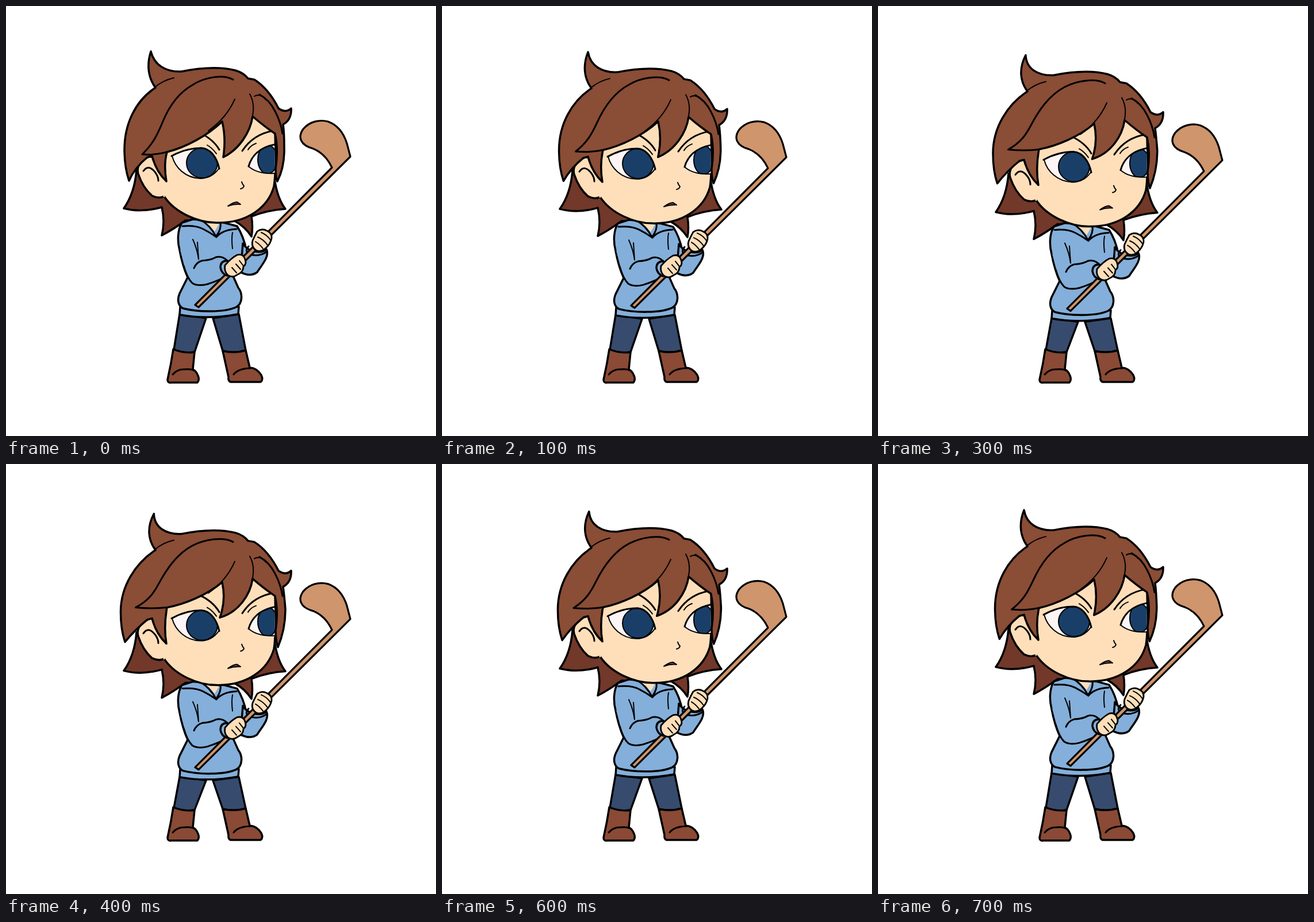
Animation, 748 px wide and 748 px high, one loop 800 ms. Source, as an HTML page:

```html
<!DOCTYPE html>
<html>
<head>
<meta charset="utf-8">
<style>
html, body { margin: 0; width: 100%; height: 100%; overflow: hidden; background: #fff; }
svg { display: block; width: 100%; height: 100%; }
path { stroke: #000; stroke-width: 3.5; stroke-linejoin: round; stroke-linecap: round; }
.line { fill: none; stroke-width: 3; }
.thin { fill: none; stroke-width: 2; }
.flat { stroke: none; }
.hair { fill: #8a4d36; }
.shade { fill: #72382a; }
.skin { fill: #ffdfba; }
.cloth { fill: #84afda; }
.pants { fill: #374b6e; }
.boot { fill: #8a4a35; }
.wood { fill: #cf956c; stroke-width: 3.2; }
.white { fill: #fdf5f5; }
.iris { fill: #193f69; stroke: #000; stroke-width: 2; }
</style>
</head>
<body>
<svg viewBox="0 0 748 748">
  <clipPath id="eyeL"><path d="M289 261C306 251 325 247 340 247C356 248 367 264 371 283Q358 301 338 301C312 300 294 281 289 261Z"/></clipPath>
  <clipPath id="eyeR"><path d="M422 279C427 261 441 246 467 241L468 292Q438 293 422 279Z"/></clipPath>

  <g id="back">
    <path class="shade" d="M227 285Q224 325 205 352Q236 360 271 350Q277 375 271 399Q292 388 312 373L398 374Q416 384 427 401Q430 385 427 366Q455 355 486 353Q472 335 467 300Z"/>
  </g>

  <g id="legs">
    <path class="pants" d="M302 536L292 598Q310 605 328 602L348 543Z"/>
    <path class="pants" d="M360 543L377 600Q398 605 417 599L405 536Z"/>
  </g>
  <path class="boot" d="M291 597Q287 624 281 650Q281 656 287 655H333Q337 650 334 643Q331 635 325 632L328 602Q310 605 291 597Z"/>
  <path class="line" d="M290 641Q298 631 312 632Q321 631 327 634"/>
  <path class="boot" d="M377 600Q398 605 417 599L424 629Q437 630 444 642Q448 650 443 654H391Q386 653 387 645Z"/>
  <path class="line" d="M396 641Q403 631 425 630"/>

  <g id="body">
    <path class="cloth" d="M303 523L302 537Q350 546 404 536L405 523Z"/>
    <path class="cloth" d="M306 377C298 390 298 410 302 425Q307 452 316 472L302 500C297 512 300 522 308 526C335 533 380 533 400 524C412 518 412 500 404 490L396 472L418 424Q413 400 402 383L372 375L325 371Z"/>
    <path class="skin flat" d="M337 371Q352 377 363 392L373 375Z"/>
    <path class="line" d="M307 383Q330 381 343 388Q355 394 366 402Q377 389 401 388M337 371Q355 381 366 402M373 376Q375 388 366 400"/>
    <path class="cloth" d="M412 413C421 429 445 431 453 423C459 436 445 450 437 463Q425 472 408 463Z"/>
    <path class="line" d="M422 418Q414 427 424 432Q441 437 454 427"/>
    <path class="thin" d="M394 394Q392 405 394 422M325 406Q333 424 335 441M333 411L335 441"/>
    <path class="cloth flat" d="M303 425L316 467Q323 486 340 485Q370 480 389 466L384 443Q374 434 362 437L338 443Z"/>
    <path class="line" d="M327 456Q331 446 341 443Q357 442 365 437Q375 434 384 442M309 452Q315 473 324 482Q333 488 350 484Q372 477 387 468"/>
    <path class="wood" d="M567 281C559 264 549 254 534 248C512 242 507 228 517 214C528 201 545 197 560 201C577 207 587 220 593 239L599 262L335 524L329 520Z"/>
    <path class="cloth" d="M385 443Q373 443 373 455Q375 466 385 469L391 463L389 447Z"/>
    <path class="skin" style="stroke-width:2.8" d="M381 451Q391 439 402 433Q413 430 416 441Q419 449 413 453Q413 463 403 467Q394 474 386 468Q379 462 381 451Z"/>
    <path class="thin" d="M406 443L413 452M400 449L408 458M393 455L401 464"/>
    <path class="skin" style="stroke-width:2.8" d="M429 408Q433 399 437 392Q445 386 454 391Q463 395 462 404Q460 414 452 421Q444 429 435 425Q426 419 429 408Z"/>
    <path class="thin" d="M444 394Q454 398 460 407M438 402Q448 406 455 416M434 410Q441 414 447 422"/>
  </g>

  <g id="head">
    <path class="skin" d="M252 261C236 266 226 278 230 292Q238 316 254 330Q266 336 275 331C294 360 335 377 366 377C420 378 456 350 466 314Q470 290 468 220L430 185L300 190Z"/>
    <path class="line" d="M239 287Q248 274 260 290Q265 297 265 304"/>
    <path class="line" d="M275 331Q274 312 277 298" style="stroke:#ffdfba"/>
    <g clip-path="url(#eyeL)">
      <path class="white flat" d="M285 240H375V304H285Z"/>
      <ellipse class="iris" cx="341" cy="273" rx="27" ry="26"/>
    </g>
    <g clip-path="url(#eyeR)">
      <path class="white flat" d="M418 236H470V295H418Z"/>
      <ellipse class="iris" cx="455" cy="267" rx="17" ry="25"/>
    </g>
    <path class="thin" d="M289 261C294 281 312 299 338 300Q358 300 370 283M422 279Q438 293 468 291"/>
    <path class="line" d="M288 261C306 251 325 247 340 247C356 248 367 264 371 283M422 279C427 261 441 246 467 241"/>
    <path class="line" d="M336 220Q361 232 371 250M411 252Q430 223 465 217"/>
    <path class="thin" d="M350 242Q359 247 366 257M421 250Q426 242 435 239M410 306Q411 310 414 313Q413 317 408 318"/>
    <path d="M386 348Q396 341 402 341L408 345Q397 344 386 348Z" fill="#8b4650" style="stroke-width:2"/>
    <path class="hair" id="hair"/>
    <path class="line" id="bangs"/>
    <path class="thin" d="M259 141Q274 129 292 125M398 162C387 187 372 203 352 217M424 153Q434 171 428 195M432 157Q442 151 452 163"/>
    <path class="line" d="M441 154Q458 163 468 183Q478 202 481 222"/>
  </g>
</svg>
<script>
const $ = id => document.getElementById(id);
const LOOP = 800, STEP = 100, DROP = 7.6, HIP = 543, KNEE = 601;

// s is the sway of the loose strands, 0 to 1
function drawHair(s) {
  const tip = `${237 - 11.5 * s} ${258 - 16 * s}`;
  const fringe = `280 ${254 - 12 * s}`;
  const edge = 206 - 6.5 * s;
  const tuft = `${252 + 5.3 * s} 79`;
  $('hair').setAttribute('d', `M${tuft}C258 103 278 115 305 114
    C340 107 371 105 399 112Q413 116 421 126L432 128Q457 144 474 178
    Q486 187 496 178Q497 198 482 206Q484 220 ${484 + 2 * s} 245
    Q${485 + s} 280 ${472 + s} ${305 + 6 * s}Q469 300 469 282Q474 250 468 222Q450 210 429 192
    C425 220 405 250 ${378 - 6 * s} ${263 - 3.5 * s}Q383 230 376 ${201 - 3 * s}
    C350 ${226 - 6 * s} 312 ${246 - 10 * s} ${fringe}Q274 276 279 305Q261 288 254 261L246 263
    Q224 281 ${214 - 7 * s} ${304 - 2 * s}Q${edge} 280 ${edge} 250
    C${edge} 205 225 165 260 142C248 126 244 104 ${tuft}Z`);
  $('bangs').setAttribute('d', `M395 128C378 118 345 124 325 ${137 - 3 * s}
    C${298 - 2 * s} ${152 - 3 * s} ${282 - 4 * s} 178 ${272 - 6 * s} ${203 - 3 * s}
    C${264 - 7 * s} ${222 - 5 * s} ${256 - 8 * s} ${240 - 10 * s} ${tip}
    Q${258 - 4 * s} ${260 - 15 * s} ${fringe}`);
}

function frame(now) {
  const t = Math.floor(now % LOOP / STEP) * STEP;
  const s = Math.sin(Math.PI * t / LOOP);
  const drop = DROP * s * s;
  for (const id of ['back', 'body', 'head'])
    $(id).setAttribute('transform', `translate(0 ${drop})`);
  const k = 1 - drop / (KNEE - HIP);
  $('legs').setAttribute('transform', `translate(0 ${KNEE * (1 - k)}) scale(1 ${k})`);
  drawHair(s);
  requestAnimationFrame(frame);
}
frame(0);
</script>
</body>
</html>
```
